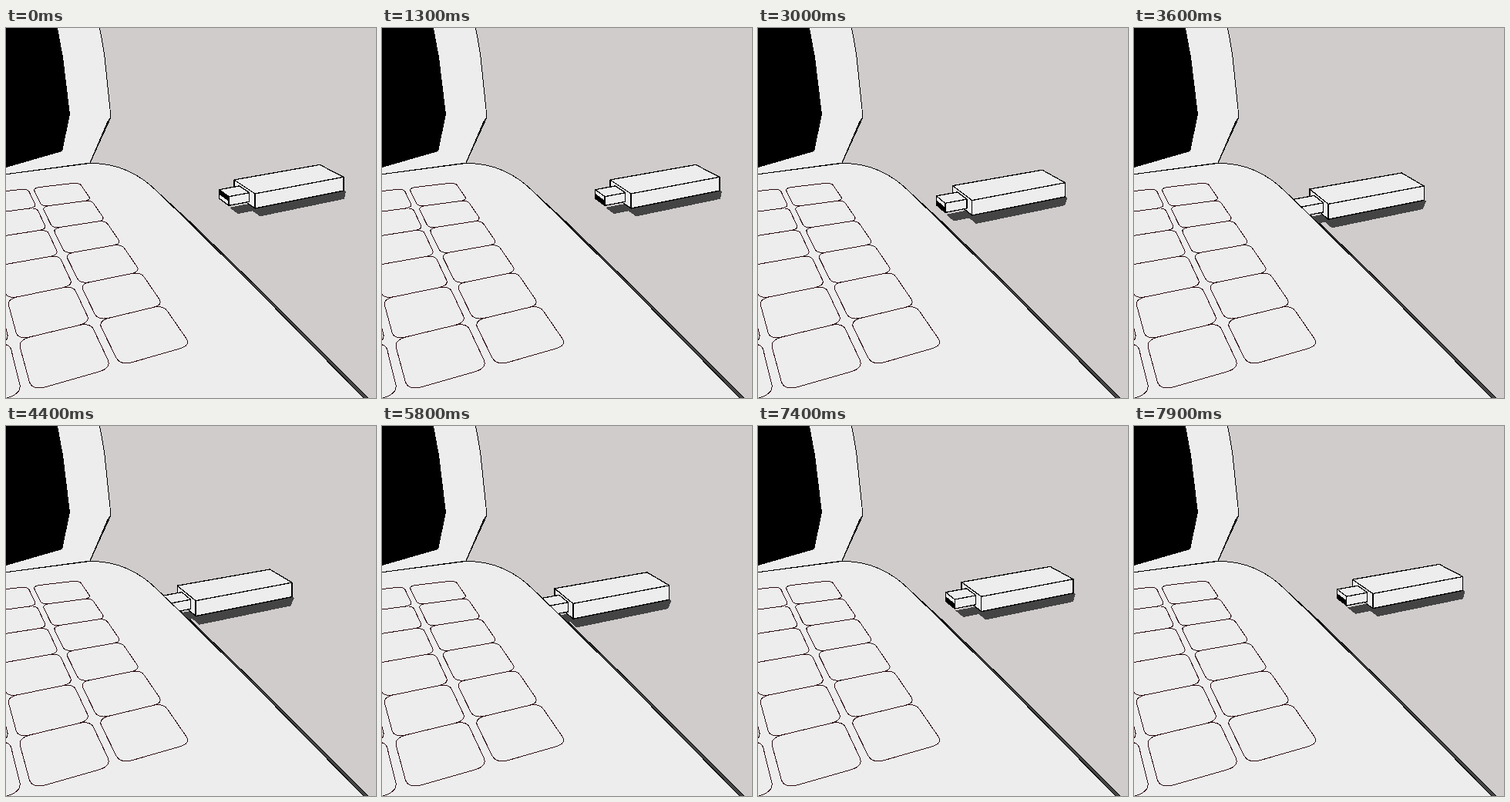
An HTML page that plays this animation: 480x480 px, repeating every 8 s.

```html
<!DOCTYPE html>
<html lang="en">
<head>
<meta charset="utf-8">
<title>Memory stick</title>
<style>
  html, body { margin: 0; width: 100%; height: 100%; overflow: hidden; background: #d0cccb; }
  svg { display: block; width: 100vw; height: 100vh; shape-rendering: crispEdges; }
  .line { stroke: #000; stroke-linejoin: round; }
  .shell { fill: #ededed; }
  #stick .line { stroke-width: 1.3; }
  #keys { stroke: #2a0a10; fill: #ededed; }
</style>
</head>
<body>
<svg viewBox="0 0 480 480">
  <rect width="480" height="480" fill="#d0cccb"/>
  <path d="M197 213L240 252.5L330 340L470 480H460Z" fill="#444" class="line"/>
  <g id="stick"></g>
  <path d="M-2 190L109 175.5C148 175 178 193 199 215L240 254.5L330 344L465 481H-2Z" class="shell line"/>
  <path d="M-2 -2H121Q126 22 128 38L136 115L109 175L-2 190Z" class="shell line"/>
  <path d="M136 116L132 121L109 175Z" class="line"/>
  <path d="M0 0H67L74 38L83 112L73 160L0 181Z"/>
  <g id="keys"></g>
</svg>
<script>
const LOOP = 8000, STEP = 100;
const round = p => p.map(v => v.toFixed(1)).join(' ');

// Keyboard plane in perspective: u runs across the columns, v down the rows.
function keyPoint(u, v) {
  const depth = 1 + 0.04 * u - 0.0685 * v;
  return [(35 + 63.8 * u + 8.7 * v) / depth, (207.5 + u + 8.42 * v) / depth];
}

function keyPath(left, top, width, r = 0.17) {
  const right = left + width, bottom = top + 1;
  const corner = (u, v, u0, v0, u1, v1) =>
    `${round(keyPoint(u + u0 * r, v + v0 * r))}Q${round(keyPoint(u, v))} ${round(keyPoint(u + u1 * r, v + v1 * r))}`;
  return 'M' + [
    corner(left, top, 0, 1, 1, 0),
    corner(right, top, -1, 0, 0, 1),
    corner(right, bottom, 0, -1, -1, 0),
    corner(left, bottom, 1, 0, 0, -1)
  ].join('L') + 'Z';
}

let keys = '';
for (let column = 0; column < 3; column++) {
  for (let row = 0; row < 6; row++) {
    const width = column ? 0.97 : 1;
    keys += `<path d="${keyPath(-1.08 * column, row, width)}"/>`;
  }
}
document.getElementById('keys').innerHTML = keys;

// Stick space in perspective: l along the body, w across it, h above the desk.
function project(l, w, h, pose) {
  l -= pose.travel;
  const depth = 1 + 0.07 * l + 0.056 * w;
  return [
    (323 + 145.7 * l - 10.4 * w) / depth,
    (234 - 8.2 * l - 7 * w - 19 * h) / depth + pose.lift
  ];
}

const polygon = (points, fill, cls = '') =>
  `<polygon points="${points.map(round).join(' ')}" fill="${fill}" class="${cls}"/>`;

const area = points => points.reduce((sum, [x, y], i) => {
  const [nx, ny] = points[(i + 1) % points.length];
  return sum + x * ny - nx * y;
}, 0);

// Rectangular cross section at l, rolled about the long axis.
function section(l, halfW, top, bottom, pose) {
  const ratio = 1.65, cos = Math.cos(pose.roll), sin = Math.sin(pose.roll);
  return [[halfW, top], [-halfW, top], [-halfW, bottom], [halfW, bottom]].map(([w, h]) =>
    project(l, 0.5 + w * cos - h * sin / ratio, 0.5 + w * ratio * sin + h * cos, pose));
}

function box(from, to, halfW, halfH, pose) {
  const near = section(from, halfW, halfH, -halfH, pose);
  const far = section(to, halfW, halfH, -halfH, pose);
  const sides = near.map((p, i) => {
    const j = (i + 1) % 4;
    return [p, far[i], far[j], near[j]];
  });
  return [near, ...sides].filter(face => area(face) > 0)
    .map(face => polygon(face, '#ededed', 'line')).join('');
}

function shadow(from, to, reach, pose) {
  const outline = [[from, 0.3], [from, -reach], [to - 0.3 * reach, -reach], [to, -0.07], [to, 0.3]];
  return polygon(outline.map(([l, w]) => project(l, w, 0, pose)), '#444');
}

// Time, travel towards the laptop, vertical offset.
const poses = [
  [0, 0, 0], [1900, 0, 0], [3700, 0.587, 0], [4600, 0.602, -3.6],
  [5500, 0.585, 1.2], [6200, 0.585, 1.2], [6400, 0.585, 0], [LOOP, 0.073, 0]
];

function poseAt(t) {
  const next = poses.findIndex(p => p[0] > t);
  const a = poses[next - 1], b = poses[next];
  const k = (t - a[0]) / (b[0] - a[0]);
  const [, travel, lift] = a.map((v, i) => v + (b[i] - v) * k);
  return { travel, lift, roll: Math.PI * Math.min(t / 600, 1) };
}

const stick = document.getElementById('stick');

function draw(t) {
  const pose = poseAt(t);
  stick.innerHTML =
    shadow(-0.2, 0, 0.1, pose) +
    shadow(-0.05, 1.005, 0.44, pose) +
    box(0, 1, 0.5, 0.5, pose) +
    box(-0.215, 0, 0.24, 0.31, pose) +
    polygon(section(-0.215, 0.22, 0.27, -0.03, pose), '#000');
}

const start = performance.now();
function tick() {
  const t = (performance.now() - start) % LOOP;
  draw(Math.floor(t / STEP) * STEP);
  requestAnimationFrame(tick);
}
tick();
</script>
</body>
</html>
```
